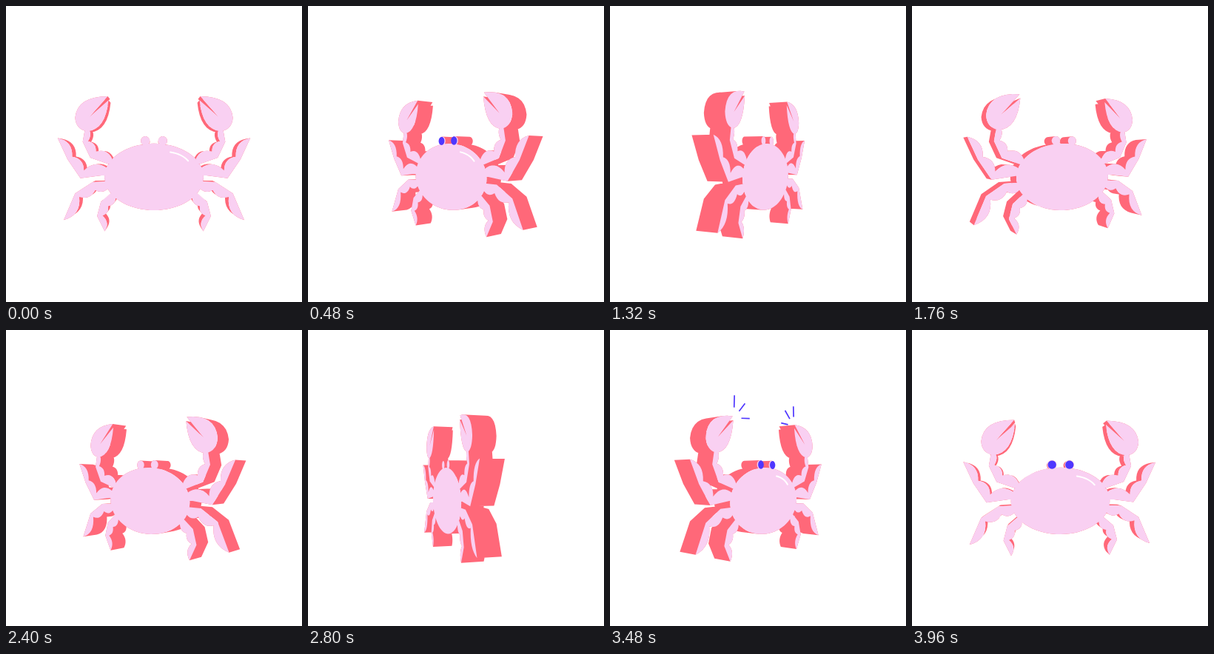
An HTML page that plays this animation: 400 px wide and 400 px high, repeating every 4 s.

```html
<!DOCTYPE html>
<html lang="en">
<head>
<meta charset="utf-8">
<title>Turning crab</title>
<style>
  html, body { margin: 0; width: 100%; height: 100%; overflow: hidden; background: #fff; }
  svg { display: block; width: 100vw; height: 100vh; }
</style>
</head>
<body>
<svg viewBox="0 0 400 400">
  <path id="walls" fill="#ff6879"/>
  <path id="face" fill="#f9d0f2"/>
  <path id="shine" fill="none" stroke="#fff" stroke-width="2" stroke-linecap="round"/>
  <path id="pupils" fill="#4f37ff"/>
  <path id="sparks" fill="none" stroke="#4f37ff" stroke-width="1.7"/>
</svg>
<script>
const LOOP = 4000, STEP = 40, CAMERA = 600, HALF = 14.6;
const SNAPS = [280, 1660, 2280, 3440], SNAP_LENGTH = 80;
const BULGE = 0.43;

// Points along a quadratic curve, without its start.
function curve([x, y], [cx, cy], [ex, ey], n = 8) {
  return Array.from({ length: n }, (_, i) => {
    const u = (i + 1) / n, v = 1 - u;
    return [v * v * x + 2 * u * v * cx + u * u * ex, v * v * y + 2 * u * v * cy + u * u * ey];
  });
}

function ellipse(cx, cy, rx, ry, n) {
  return Array.from({ length: n }, (_, i) => {
    const a = i / n * 2 * Math.PI;
    return [cx + rx * Math.cos(a), cy + ry * Math.sin(a)];
  });
}

function unit([ax, ay], [bx, by]) {
  const len = Math.hypot(bx - ax, by - ay);
  return [(bx - ax) / len, (by - ay) / len];
}

// A limb from body to tip: straight outer edge, scalloped inner edge.
// side is 1 for limbs that curl up and -1 for limbs that curl down.
function limb(side, ...joints) {
  const widths = [8, 11, 7, 0];
  const shift = ([x, y], [dx, dy], by) => [x - dy * by * side, y + dx * by * side];
  const inner = joints.map((p, i) => {
    const dir = unit(joints[Math.max(i - 1, 0)], p === joints[0] ? joints[1] : p);
    const next = i < joints.length - 1 ? unit(p, joints[i + 1]) : dir;
    return shift(p, unit([0, 0], [dir[0] + next[0], dir[1] + next[1]]), widths[i]);
  });
  const edge = [inner[0]];
  for (let i = 1; i < inner.length; i++) {
    const a = inner[i - 1], b = inner[i];
    const mid = [(a[0] + b[0]) / 2, (a[1] + b[1]) / 2];
    const size = Math.hypot(b[0] - a[0], b[1] - a[1]) * BULGE;
    edge.push(...curve(a, shift(mid, unit(a, b), size), b));
  }
  return edge.concat(joints.slice(0, -1).reverse());
}

function makeClaw() {
  const tip = [-61, -76], side = [-104, -48], base = [-88, -30], finger = [-60, -71];
  return [tip, ...curve(tip, [-101, -76], side), ...curve(side, [-103, -32], base),
    ...curve(base, [-64, -32], finger), [-85, -49]];
}

// Rays fanning out from the tip of the claw.
function makeSparks() {
  return [-88, -46, -4].map(deg => {
    const a = deg * Math.PI / 180;
    return [13, 28].map(r => [-59 + r * Math.cos(a), -74 + r * Math.sin(a)]);
  });
}

const mirror = points => points.map(([x, y]) => [-x, y]);
const bothSides = shapes => shapes.concat(shapes.map(mirror));
const eye = r => ellipse(-11.5, -17.4, r, r, 24);

const parts = bothSides([
  makeClaw(),
  limb(1, [-58, 14], [-84, 5], [-94, -16], [-90, -38]),
  limb(1, [-60, 27], [-97, 32], [-114, 7], [-127, -21]),
  limb(-1, [-60, 36], [-81, 37], [-104, 52], [-119, 87]),
  limb(-1, [-56, 51], [-70, 63], [-75, 82], [-65, 102]),
  eye(5.9)
]);
parts.push(ellipse(0, 30.2, 65.3, 44, 72));

const pupils = bothSides([eye(5.5)]);
const sparks = bothSides(makeSparks());
const shine = [[[21.5, -2.5], ...curve([21.5, -2.5], [37, 0], [45, 9])]];

function projector(angle) {
  const c = Math.cos(angle), s = Math.sin(angle);
  return ([x, y], z) => {
    const k = CAMERA / (CAMERA - x * s - z * c);
    return [200 + (x * c - z * s) * k, 200 + y * k];
  };
}

const line = points => "M" + points.map(p => p[0].toFixed(2) + " " + p[1].toFixed(2)).join("L");

function area(p) {
  return p.reduce((sum, [x, y], i) => {
    const [nx, ny] = p[(i + 1) % p.length];
    return sum + x * ny - nx * y;
  }, 0);
}

// The same winding everywhere, so that overlaps never cancel out.
const polygon = p => line(area(p) < 0 ? p.reverse() : p) + "Z";

function wallPath(project) {
  let d = "";
  for (const part of parts) {
    const front = part.map(p => project(p, HALF)), back = part.map(p => project(p, -HALF));
    front.forEach((p, i) => {
      const j = (i + 1) % front.length;
      d += polygon([p, front[j], back[j], back[i]]);
    });
  }
  return d;
}

const flat = (shapes, project, z, draw) =>
  shapes.map(shape => draw(shape.map(p => project(p, z)))).join("");

const set = (id, d) => document.getElementById(id).setAttribute("d", d);

function draw(t) {
  const angle = t / LOOP * 2 * Math.PI, project = projector(angle);
  const facing = CAMERA * Math.cos(angle);
  const front = facing > HALF, back = facing < -HALF;
  const snapping = SNAPS.some(at => t >= at && t < at + SNAP_LENGTH);

  set("walls", wallPath(project));
  set("face", front || back ? flat(parts, project, front ? HALF : -HALF, polygon) : "");
  set("shine", front ? flat(shine, project, HALF, line) : "");
  set("pupils", front && t >= STEP ? flat(pupils, project, HALF + 1.5, polygon) : "");
  set("sparks", snapping ? flat(sparks, project, HALF, line) : "");
}

const start = performance.now();
function tick() {
  const t = (performance.now() - start) % LOOP;
  draw(Math.floor(t / STEP) * STEP);
  requestAnimationFrame(tick);
}
tick();
</script>
</body>
</html>
```
